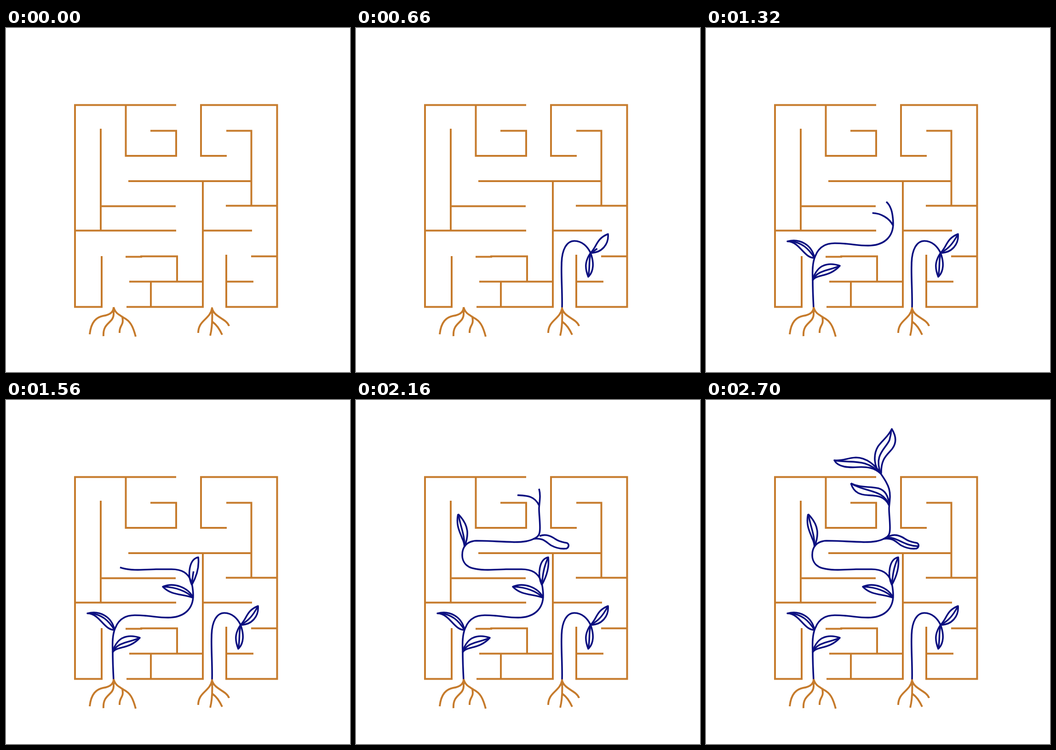
An HTML page that plays this animation: 748 by 748 pixels, repeating every 8400 ms.

```html
<!DOCTYPE html>
<html lang="en">
<head>
<meta charset="utf-8">
<title>Maze plants</title>
<style>
  html, body { margin: 0; width: 100%; height: 100%; overflow: hidden; background: #fff; }
  svg { display: block; width: 100%; height: 100%; fill: none; }
</style>
</head>
<body>
<svg viewBox="0 0 748 748">
  <g id="plants" stroke="#0b0f80" stroke-width="3.6" stroke-linejoin="round"></g>
  <g stroke="#c67b2c" stroke-width="4">
    <path d="M370 167.5H150V606.5H208V496 M260.5 167V278H370V223.5H314 M206 219V441
      M206 387.5H369 M150 440.5H370 M480 278H424V167.5H589.5V606.5H479V493
      M479 223.5H533.5V386 M266 333H533 M478 386.5H590 M428 333V606.5H262
      M428 440.5H535 M260 497.5H294V496.5H372V552 M268 551.5H428 M315 552V607
      M479 551.5H538 M533 496.5H590"/>
    <path stroke-linejoin="round" d="M182 666C185 638 197 629 211 626C225 624 234 618 234 607
      M212 670C210 640 234 642 234 622V610
      M234 607C238 622 248 624 256 630C270 637 276 648 282 671
      M247 663C246 645 257 648 253 629
      M418 663C418 635 444 634 448 609
      M444 669C449 650 449 630 448 609C452 629 480 632 485 648
      M449 639C459 646 465 656 470 667"/>
  </g>
</svg>
<script>
const STEP = 60, LOOP = 8400;

// Each stroke: first step, last step, path
const strokes = [
  // drooping plant: stem, upper leaf, lower leaf
  [0, 5.7, "M448 609C449 580 446 540 447 515C447 480 459 463 475 463C492 463 504 476 510 489"],
  [5.7, 10.4, "M510 489C524 476 522 458 548 448C550 470 535 489 510 489"],
  [10.4, 12.3, "M510 489C528 480 537 468 547 450"],
  [5.7, 9.3, "M510 489C498 507 497 521 505 541C517 530 518 510 510 489"],
  [9.3, 11, "M510 489C506 508 509 520 505 541"],

  // climbing stem
  [11.5, 17, "M234 609C233 590 232 560 232 545C231 525 233 505 238 495C246 475 262 468 280 468Q291 468 303 469"],
  [17, 26, "M302 469C325 471 340 474 358 473C390 471 407 452 407 425C407 415 405 400 402 393C396 376 382 368 360 368H326C300 369 270 372 248 364"],
  [26, 31, "M249 364.3C236 359 231 348 231 337C231 320 240 307 262 306C285 306 310 308 344 309"],
  [31, 36, "M343 309C365 309 378 307 390 300C398 296 400 290 400 278C400 260 398 250 398 235C399 220 402 208 398 193"],
  [36, 37.3, "M398.3 194C395 182 388 172 380 160"],

  // leaves, bottom to top
  [13.9, 18, "M232 549C238 535 268 543 291 517C270 510 252 514 242 527Q234 537 232 549"],
  [18, 20, "M233 547C243 525 270 528 290 517"],
  [15.4, 19, "M236 500C212 500 204 464 177 464C204 457 230 471 236 500"],
  [19, 21, "M236 500C222 478 208 467 186 464"],
  [20.5, 24.5, "M407 430C396 407 365 396 341 406C360 426 385 421 407 430"],
  [24.5, 26, "M407 430C390 414 368 407 343 406"],
  [22, 25.2, "M404 402C394 380 398 346 418 342C421 367 412 388 404 402"],
  [25.2, 26.8, "M404 402C406 385 406 370 417 344"],
  [28, 29.8, "M236 319C245 295 247 273 222 248"],
  [29.8, 31.4, "M222 248C217 272 225 285 231 301Q235 309 236 319"],
  [31.4, 33, "M236 319C237 295 227 275 223 250"],
  [32.3, 36.3, "M385 302C407 299 412 308 424 316C437 323 450 324 458 323C463 320 464 314 459 311C450 309 443 309 433 302C415 290 404 292 388 301"],
  [36.3, 38.5, "M390 300C415 295 427 317 461 318"],
  [34.5, 37.3, "M398 229C388 208 371 208 352 207C338 206 322 204 315 181"],
  [37.3, 40, "M315 181C335 192 357 187 375 192C389 196 397 208 398 229"],
  [40, 42.5, "M398 229C386 194 351 202 316 182"],
  [37.3, 42.7, "M380 160C369 143 350 125 326 125C306 126 298 133 279 131C287 147 312 147 330 146C350 145 366 147 380 160"],
  [42.7, 45, "M380 160C347 127 322 137 281 132"],
  [37.3, 42.7, "M380 160C365 147 363 119 374 101C384 87 396 80 404 63C414 79 414 94 405 106C395 119 380 126 381 160"],
  [42.7, 45, "M380 160C364 119 391 106 399 87Q402 76 403 65"],
].map(([from, to, d]) => {
  const el = document.createElementNS("http://www.w3.org/2000/svg", "path");
  el.setAttribute("d", d);
  plants.append(el);
  return { el, from, to, length: el.getTotalLength() };
});

function draw(time) {
  const step = Math.floor(time % LOOP / STEP);
  for (const { el, from, to, length } of strokes) {
    const part = Math.min(1, Math.max(0, (step - from) / (to - from)));
    el.style.visibility = part ? "visible" : "hidden";
    el.style.strokeDasharray = part < 1 ? `${part * length} ${length + 9}` : "none";
  }
}

const start = performance.now();
function tick() {
  draw(performance.now() - start);
  requestAnimationFrame(tick);
}
tick();
</script>
</body>
</html>
```
